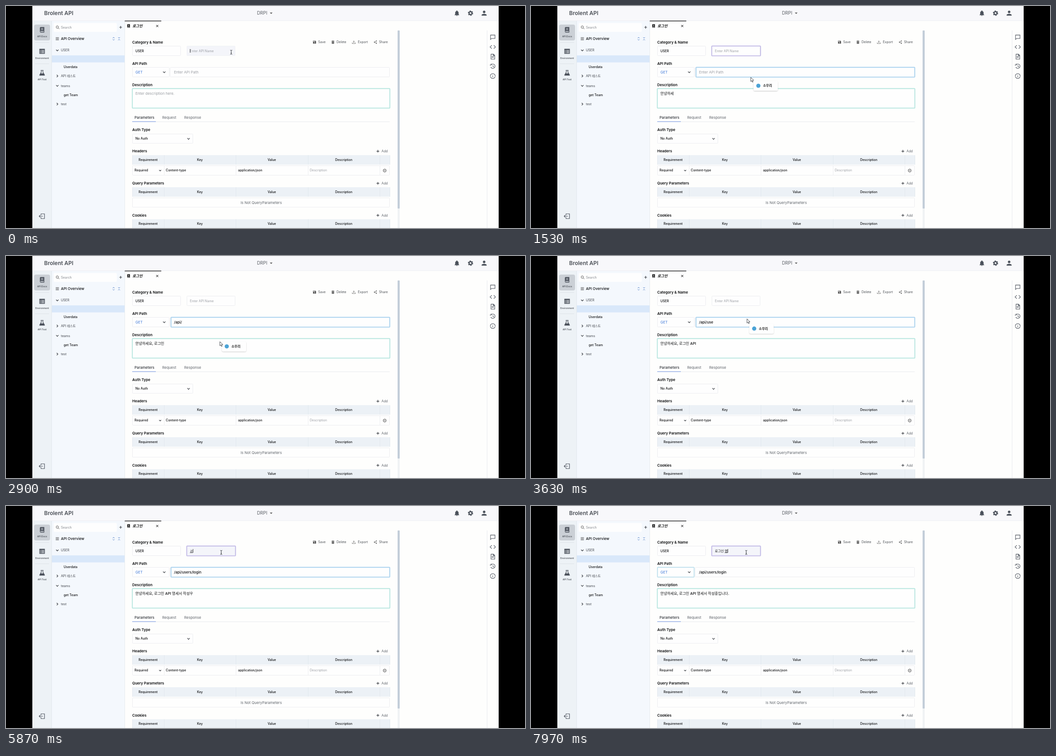
These frames come from a looping animation (1143 by 490 pixels, 8 s). An HTML page:

```html
<!DOCTYPE html>
<html lang="ko">
<head>
<meta charset="utf-8">
<title>API editor</title>
<style>
  html, body { margin: 0; width: 100%; height: 100%; overflow: hidden; background: #000; }
  svg { display: block; width: 100%; height: 100%; }
  text { font-family: Inter, "Noto Sans CJK KR", "Noto Sans CJK", sans-serif; white-space: pre; }
</style>
</head>
<body>
<svg id="stage" viewBox="0 0 1143 490"></svg>
<script>
const LOOP = 8000;
const stage = document.getElementById('stage');
const INK = '#0c0d0f', GREY = '#5f646b', HINT = '#9a9da3', EDGE = '#ecedf0', ICON = '#4b515b';

// Markup helpers; text is placed by the middle of its capitals.
const rect = (x, y, w, h, fill, extra = '') =>
  `<rect x="${x}" y="${y}" width="${w}" height="${h}" fill="${fill}" ${extra}/>`;
const text = (x, y, str, size = 7, fill = INK, weight = 500, extra = '') =>
  `<text x="${x}" y="${y + size * .364}" font-size="${size}" fill="${fill}" font-weight="${weight}" ${extra}>${str}</text>`;
const centred = (x, y, str, size, fill, weight) => text(x, y, str, size, fill, weight, 'text-anchor="middle"');
const line = (d, color = EDGE, width = 1, extra = '') =>
  `<path d="${d}" fill="none" stroke="${color}" stroke-width="${width}" ${extra}/>`;
const box = (x, y, w, h, fill = '#fefefe') => rect(x + .5, y + .5, w - 1, h - 1, fill, `stroke="${EDGE}" rx="1"`);
const chevron = (x, y, turn = 0, size = 2.6, color = '#33373d', width = 1.2) =>
  line(`M${-size} ${-size / 2}L0 ${size / 2}L${size} ${-size / 2}`, color, width, `transform="translate(${x} ${y}) rotate(${turn})"`);
const plus = (x, y, r = 3) => line(`M${x - r} ${y}h${2 * r}M${x} ${y - r}v${2 * r}`, '#3c4046', 1.2);
const focusRing = (id, x, y, w, h, color) =>
  `<g id="${id}" fill="none" stroke="${color}">${rect(x, y, w, h, 'none', 'rx="1.5" stroke-width="2.4" opacity=".35"')}
   ${rect(x, y, w, h, 'none', 'rx="1" stroke-width="1.2" opacity=".8"')}</g>`;

// Icons live on a 24-unit grid; those in arrays are stroked, the others filled.
const ICONS = {
  bell: '<path d="M12 22a2 2 0 0 0 2-2h-4a2 2 0 0 0 2 2zm6-6v-5c0-3-1.6-5.6-4.5-6.3V4a1.5 1.5 0 0 0-3 0v.7C7.6 5.4 6 8 6 11v5l-2 2v1h16v-1z"/>',
  person: '<circle cx="12" cy="8" r="4"/><path d="M12 14c-2.7 0-8 1.3-8 4v2h16v-2c0-2.7-5.3-4-8-4z"/>',
  gear: '<g fill="none" stroke="currentColor"><circle cx="12" cy="12" r="5.6" stroke-width="4.2"/><circle cx="12" cy="12" r="8.5" stroke-width="3" stroke-dasharray="4.5 4.4"/></g>',
  book: '<path fill-rule="evenodd" d="M6 2h14v20H7a3 3 0 0 1-3-3V5a3 3 0 0 1 2-3zM8 6h8v2H8zM8 10h8v2H8zM7 16.5h11v3H7a1.5 1.5 0 0 1 0-3z"/>',
  list: '<path fill-rule="evenodd" d="M2 3h20v18H2zM4 8h3v2H4zM9 8h11v2H9zM4 12h3v2H4zM9 12h11v2H9zM4 16h3v2H4zM9 16h11v2H9z"/>',
  flask: '<path fill-rule="evenodd" d="M7 2h10v2h-1v5l6 11a1.5 1.5 0 0 1-1 2H3a1.5 1.5 0 0 1-1-2L8 9V4H7zM10 4v6l-2 4h8l-2-4V4z"/>',
  save: '<path fill-rule="evenodd" d="M17 3H3v18h18V7zM12 19a3 3 0 1 1 0-6 3 3 0 0 1 0 6zM5 5h10v4H5z"/>',
  trash: '<path fill-rule="evenodd" d="M5 8h14v14H5zM8.5 10v9h1.5v-9zM14 10v9h1.5v-9zM9 2h6l1 2h5v2H3V4h5z"/>',
  share: '<circle cx="18" cy="5" r="3"/><circle cx="6" cy="12" r="3"/><circle cx="18" cy="19" r="3"/><path d="M18 5L6 12l12 7" fill="none" stroke="currentColor" stroke-width="2"/>',
  export: ['M12 2v12M7 9l5 5 5-5M2 15v6h20v-6'],
  leave: ['M8 8V3h13v18H8v-5M15 12H1M5 7.5L.8 12 5 16.5'],
  comment: ['M3 3h18v14H7l-4 4z'],
  code: ['M8 5L1 12l7 7M16 5l7 7-7 7'],
  doc: ['M5 2h10l5 5v15H5zM8 11h8M8 15h8M14 2v6h6'],
  history: ['M5 6a9 9 0 1 1-1 9M5 1v6H0M13 7v6l4 2'],
  info: ['M12 2a10 10 0 1 0 .01 0M12 11v6M12 7v2'],
};
const icon = (name, x, y, size, color = ICON) => {
  const art = ICONS[name];
  const body = Array.isArray(art) ? line(art[0], 'currentColor', 2) : art;
  return `<g transform="translate(${x - size / 2} ${y - size / 2}) scale(${size / 24})" fill="${color}" color="${color}">${body}</g>`;
};

function topBar() {
  return rect(58, 0, 1027, 32, '#f8f8fb') + line('M58 32.5H1085', '#eeeff3') +
    text(84, 15.8, 'Brolent API', 12, '#4c5057', 600) +
    centred(564, 15.8, 'DRPI', 10, '#5c6067', 400) +
    '<path d="M581 14.5h6l-3 3z" fill="#555"/>' +
    icon('bell', 993, 15.8, 15) + icon('gear', 1023, 15.8, 14) + icon('person', 1053, 15.8, 16.5);
}

function leftRail() {
  const item = (name, y, label) => icon(name, 79.5, y, 14.5) + centred(79.5, y + 14.7, label, 5, '#3f444c', 500);
  return rect(58, 33, 43, 457, '#edf2f6') + line('M100.5 33V490', '#e2e7ec') +
    rect(62, 41, 35, 35, '#cbd0d6', 'rx="4"') + line('M64 80.5h31M64 127.5h31', '#dde2e7') +
    item('book', 52.5, 'API Docs') + item('list', 100, 'Environment') + item('flask', 147.5, 'API Test') +
    icon('leave', 79.5, 464, 14);
}

function sidebar() {
  const group = (y, label, open) => chevron(113, y, open ? 0 : -90) + text(121, y, label, 7, '#40444b', 400);
  return rect(101, 33, 160, 457, '#f4f8fd') + line('M261.5 33V490', '#e6eaef') +
    rect(105, 37.5, 139, 19.5, '#fefefe', 'rx="2"') +
    '<circle cx="113" cy="46.5" r="2.6" fill="none" stroke="#555"/>' + line('M115 48.5l2.5 2.5', '#555') +
    text(121, 47, 'Search', 7.2, '#85888e', 400) + plus(252.5, 47) +
    line('M109.5 69.8h7M109.5 72.3h7M109.5 74.8h7', '#444') + text(121, 71.8, 'API Overview', 8, INK, 500) +
    chevron(237, 70, 180, 2, '#5380c8', 1) + chevron(237, 74.5, 0, 2, '#5380c8', 1) +
    chevron(249, 70, 0, 2, '#5380c8', 1) + chevron(249, 74.5, 180, 2, '#5380c8', 1) +
    rect(101, 109, 160, 15.5, '#d9e8fa') +
    group(97.8, 'USER', true) + text(127, 134.1, 'Userdata') + group(154.5, 'API 테스트', false) +
    group(176, 'teams', true) + text(127, 196.4, 'get Team') + group(216.6, 'test', false);
}

function editorTab() {
  return rect(262, 33, 80, 22, '#fefefe') + rect(261.5, 32.4, 80.5, 1.4, '#1c1c1c') +
    icon('book', 270, 44, 9, '#111') + text(278.5, 43.6, '로그인', 8, '#111', 700, 'font-style="italic"') +
    line('M330.8 41.8l4.6 4.6m0-4.6l-4.6 4.6', '#444', 1.1);
}

const heading = (y, str) => text(278, y, str, 8, INK, 600);

function table(y, title) {
  const columns = [278, 348, 506, 665, 823, 845];
  const names = ['Requirement', 'Key', 'Value', 'Description'];
  return heading(y, title) + plus(819, y + .4) + text(827, y + .4, 'Add', 7.2, GREY, 400) +
    rect(278, y + 9, 567, 21, '#ecf1f6') +
    columns.map(x => line(`M${x + .5} ${y + 9}v21`, '#e2e8ee')).join('') +
    names.map((name, i) => centred((columns[i] + columns[i + 1]) / 2, y + 19, name, 6.9, INK, 500)).join('');
}

function form() {
  const action = (name, x, label) =>
    icon(name, x, 79.7, 8.5, '#444') + text(x + 8 + (name === 'export'), 79.7, label, 7.1, '#4b4f55', 400);
  return heading(79.6, 'Category &amp; Name') +
    action('save', 679.5, 'Save') + action('trash', 720, 'Delete') + action('export', 766, 'Export') + action('share', 813.5, 'Share') +
    box(278, 88, 107, 22) + text(285, 99, 'USER', 7.1) + box(398, 88, 107, 22) +
    heading(126.6, 'API Path') + box(278, 135, 82, 22) + text(285, 145.8, 'GET', 8, '#3d78d8', 400) + chevron(348.5, 146) +
    box(361, 135, 484, 22) + heading(173.7, 'Description') + rect(278, 182, 567, 43.5, '#fefefe') +
    text(283, 245.8, 'Parameters', 8, '#30343a', 500) + text(344, 245.8, 'Request', 8, GREY, 400) + text(392.5, 245.8, 'Response', 8, GREY, 400) +
    line('M278 255.5H845', '#e8eaed') + rect(278, 254.6, 52, 1.4, '#8fa9e4') +
    heading(273, 'Auth Type') + box(278, 282, 134, 21.5) + text(285, 292.8, 'No Auth', 7.1) + chevron(402, 293) +
    table(320.2, 'Headers') + box(278, 352, 567, 22) +
    line('M348.5 352v22M506.5 352v22M665.5 352v22M823.5 352v22') +
    text(283, 362.6, 'Required') + chevron(339.5, 363, 0, 2.1) + text(352, 362.6, 'Content-type') +
    text(511, 362.6, 'application/json') + text(669, 362.6, 'Description', 7, HINT, 400) +
    '<circle cx="834" cy="363.2" r="3.3" fill="none" stroke="#444"/>' + line('M832.4 363.2h3.2', '#444') +
    table(391, 'Query Parameters') + box(278, 423, 567, 21.5) + centred(562, 434.1, 'Is Not QueryParameters', 8, GREY, 400) +
    table(461.7, 'Cookies');
}

function rightSide() {
  const tools = ['comment', 'code', 'doc', 'history', 'info'];
  return rect(862.5, 54, 4.5, 436, '#f0f2f4') + rect(862.5, 54, 4.5, 393, '#c2cdd8', 'rx="1"') +
    line('M1059.5 54V490', '#e8eaee') + tools.map((name, i) => icon(name, 1072, 69 + i * 21.4, 13)).join('');
}

function livePart() {
  return rect(398.5, 88.5, 106, 21, '#f4f5fa', 'id="hover"') +
    focusRing('nameRing', 398, 88.3, 107.5, 21.7, '#b3a8e2') +
    focusRing('pathRing', 363.5, 135.3, 481.7, 21.7, '#93c7ec') +
    focusRing('methodRing', 278.5, 135.3, 80.7, 21.7, '#9ad2e6') +
    focusRing('descriptionRing', 278.2, 182.2, 567.2, 43.2, '#a2dfd6') +
    text(405, 99, '', 7.1, INK, 500, 'id="name"') + text(370, 146.1, '', 8, INK, 500, 'id="path"') +
    text(285, 193.5, '', 8, INK, 500, 'id="description"') +
    rect(0, 102.6, 0, .8, INK, 'id="composing"') + rect(0, 95, .8, 8, INK, 'id="caret"') +
    `<g id="tag">${rect(0, 0, 53.5, 21.5, '#fefefe', 'rx="3" filter="url(#shadow)"')}
      <circle cx="10.7" cy="10.5" r="4.6" fill="#4ba3d6"/>${text(21, 10.3, '소무리', 7.2, '#222', 600)}</g>
    <path id="arrow" d="M0 0V9.2L2.1 7.3 3.6 10.6 5.1 9.9 3.6 6.7 6.5 6.5z" fill="#fff" stroke="#33363b" stroke-width=".9"/>
    <path id="beam" d="M-2.2-4.5Q0-4.5 0-3.5Q0-4.5 2.2-4.5M0-3.5V3.5M-2.2 4.5Q0 4.5 0 3.5Q0 4.5 2.2 4.5M-1 1.8H1" fill="none" stroke="#33363b"/>`;
}

stage.innerHTML =
  `<defs><filter id="shadow" x="-20%" y="-30%" width="140%" height="180%">
    <feDropShadow dx="0" dy="1.2" stdDeviation="1.3" flood-color="#000" flood-opacity=".2"/></filter></defs>` +
  rect(58, 0, 1027, 490, '#fefefd') + leftRail() + sidebar() + topBar() + editorTab() + form() + rightSide() + livePart();

const part = Object.fromEntries([...stage.querySelectorAll('[id]')].map(el => [el.id, el]));

// Each entry: time, text shown from then on.
const greet = '안녕하세요, ', topic = greet + '로그인 ', doc = topic + 'API ', write = doc + '명세서 ';
const descriptionTyping = [
  [0, ''], [200, 'ㅇ'], [300, '아'], [430, '안'], [630, '안ㄴ'], [950, '안녀'], [1050, '안녕'], [1180, '안녕ㅎ'],
  [1270, '안녕하'], [1400, '안녕핫'], [1500, '안녕하세'], [1590, '안녕하셍'], [1640, '안녕하세요'], [1720, greet],
  [1950, greet + 'ㄹ'], [2100, greet + '로'], [2300, greet + '록'], [2450, greet + '로그'], [2770, greet + '로긍'],
  [2830, greet + '로그이'], [2900, topic], [3200, topic + 'A'], [3350, topic + 'AP'], [3500, doc], [3750, doc + 'ㅁ'],
  [3900, doc + '며'], [4030, doc + '명'], [4150, doc + '명ㅅ'], [4280, doc + '명세'], [4600, doc + '명셋'], [4700, doc + '명세서'],
  [5100, write + 'ㅈ'], [5230, write + '자'], [5330, write + '작'], [5470, write + '작ㅅ'], [5560, write + '작서'],
  [5650, write + '작성'], [5730, write + '작성우'], [6270, write + '작성'], [6400, write + '작성주'], [6600, write + '작성중'],
  [6750, write + '작성중이'], [6900, write + '작성중입'], [7400, write + '작성중입ㄴ'], [7530, write + '작성중입니'],
  [7670, write + '작성중입닏'], [7800, write + '작성중입니다'], [7930, write + '작성중입니다.'],
];
const nameTyping = [[0, ''], [5870, 'ㄹ'], [6070, '로'], [6230, '록'], [6370, '로그'], [6600, '로긍'], [6750, '로그이'],
  [6900, '로그인'], [7450, '로그인 ㅁ'], [7650, '로그인 며'], [7850, '로그인 명']];
const keyTimes = [2200, 2350, 2550, 2800, 2880, 3150, 3350, 3550, 3750, 3950, 4200, 4650, 4750, 4850, 5150, 5300];
const pathTyping = [[0, ''], ...keyTimes.map((time, i) => [time, '/api/users/login'.slice(0, i + 1)])];

// Pointer and label routes: time, x, y.
const pointerRoute = [[930, 496, 102], [1230, 487, 151], [1530, 484, 157.5], [1900, 484, 157.5], [2550, 471, 189],
  [3070, 471, 189], [3500, 476, 150], [3870, 475, 111], [4100, 474, 102.5]];
const tagRoute = [[1030, 493, 128], [1300, 492, 162], [1530, 490, 165.5], [1930, 490, 165.5], [2620, 475.5, 189],
  [3120, 475.5, 189], [3550, 481, 155], [3900, 480, 116]];

const clamp = v => Math.min(1, Math.max(0, v));
const smooth = v => v * v * (3 - 2 * v);
const ramp = (t, from, to) => smooth(clamp((t - from) / (to - from)));
const latest = (steps, t) => steps.findLast(step => step[0] <= t)[1];
function along(route, t) {
  const next = route.findIndex(stop => stop[0] > t);
  if (next < 0) return route.at(-1).slice(1);
  if (next === 0) return route[0].slice(1);
  const [a, b] = [route[next - 1], route[next]];
  const k = smooth((t - a[0]) / (b[0] - a[0]));
  return [a[1] + (b[1] - a[1]) * k, a[2] + (b[2] - a[2]) * k];
}
const show = (el, on) => el.setAttribute('visibility', on ? 'visible' : 'hidden');
const move = (el, [x, y]) => el.setAttribute('transform', `translate(${x} ${y})`);
function fill(el, value, hint) {
  el.textContent = value || hint;
  el.setAttribute('fill', value ? INK : HINT);
  el.setAttribute('font-weight', value ? 500 : 400);
}

function draw(t) {
  const name = latest(nameTyping, t);
  fill(part.name, name, 'Enter API Name');
  fill(part.path, latest(pathTyping, t), 'Enter API Path');
  fill(part.description, latest(descriptionTyping, t), 'Enter description here.');

  part.nameRing.setAttribute('opacity', ramp(t, 30, 280) - ramp(t, 1900, 2200) + ramp(t, 4620, 4900));
  part.pathRing.setAttribute('opacity', ramp(t, 30, 600) - ramp(t, 6800, 7200));
  part.methodRing.setAttribute('opacity', .75 * ramp(t, 7450, 7900));

  const pointer = along(pointerRoute, t);
  const inName = pointer[1] < 110;
  show(part.hover, inName);
  show(part.beam, inName);
  show(part.arrow, !inName);
  show(part.tag, !inName && t > 1030);
  move(part.beam, pointer);
  move(part.arrow, pointer);
  move(part.tag, along(tagRoute, t));

  const end = name ? part.name.getEndPositionOfChar(name.length - 1).x : 405;
  const start = name ? part.name.getStartPositionOfChar(name.length - 1).x : 405;
  part.caret.setAttribute('x', end);
  show(part.caret, t < 1000 || t >= 4650);
  part.composing.setAttribute('x', start);
  part.composing.setAttribute('width', end - start);
}

function tick(now) {
  draw(now % LOOP);
  requestAnimationFrame(tick);
}
draw(0);
requestAnimationFrame(tick);
</script>
</body>
</html>
```
